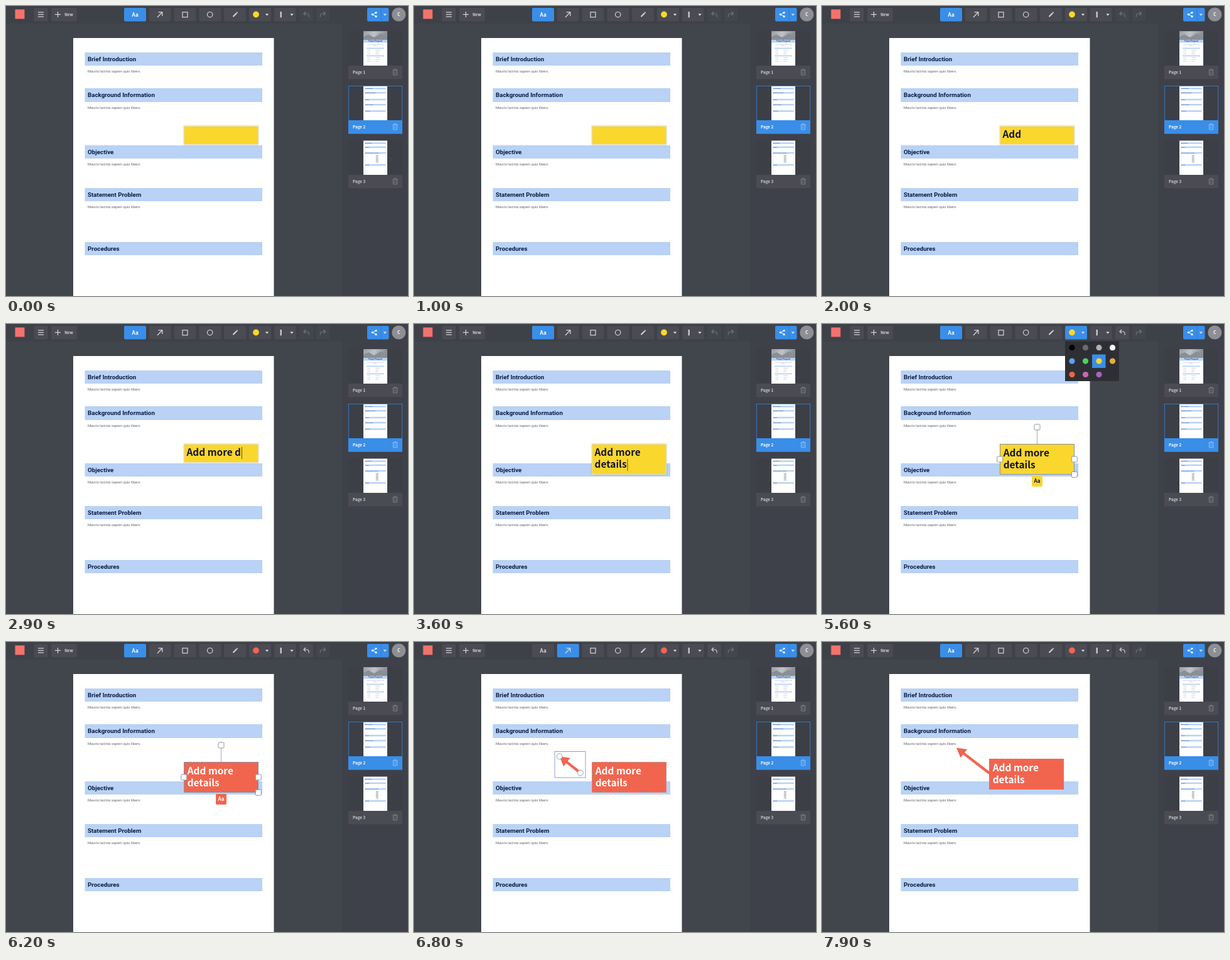
Write an HTML page with a canvas that moves like this. It is 640x462 px and loops after 8 s.

```html
<!DOCTYPE html>
<html lang="en">
<head>
<meta charset="utf-8">
<title>Document annotation</title>
<style>
html, body { margin: 0; width: 100%; height: 100%; overflow: hidden; background: #41464d; }
canvas { display: block; width: 640px; height: 462px; }
</style>
</head>
<body>
<canvas id="stage"></canvas>
<script>
const W = 640, H = 462, LOOP = 8000;
const UI = '"Noto Sans CJK JP", "Noto Sans CJK SC", "Noto Sans CJK", sans-serif';
const DOC = 'Roboto, sans-serif';
const BLUE = '#3a8ee8', BUTTON = '#4b4b54', BAR = '#b9d2f5', NAVY = '#0b1d45';
const YELLOW = '#fad72c', RED = '#f1654f', ICON = '#d5d5d9';

const canvas = document.getElementById('stage');
const dpr = window.devicePixelRatio || 1;
canvas.width = W * dpr;
canvas.height = H * dpr;
const c = canvas.getContext('2d');

function rect(x, y, w, h, fill) {
  c.fillStyle = fill;
  c.fillRect(x, y, w, h);
}

function outline(x, y, w, h, color, lw = 1) {
  c.strokeStyle = color;
  c.lineWidth = lw;
  c.strokeRect(x, y, w, h);
}

function round(x, y, w, h, r, fill, stroke, lw = 1) {
  c.beginPath();
  c.roundRect(x, y, w, h, r);
  if (fill) { c.fillStyle = fill; c.fill(); }
  if (stroke) { c.strokeStyle = stroke; c.lineWidth = lw; c.stroke(); }
}

function dot(x, y, r, fill, stroke, lw = 1) {
  c.beginPath();
  c.arc(x, y, r, 0, Math.PI * 2);
  if (fill) { c.fillStyle = fill; c.fill(); }
  if (stroke) { c.strokeStyle = stroke; c.lineWidth = lw; c.stroke(); }
}

function path(points, stroke, lw = 1.2) {
  c.beginPath();
  points.forEach(([x, y], i) => i ? c.lineTo(x, y) : c.moveTo(x, y));
  c.strokeStyle = stroke;
  c.lineWidth = lw;
  c.stroke();
}

function poly(points, fill) {
  c.beginPath();
  points.forEach(([x, y]) => c.lineTo(x, y));
  c.closePath();
  c.fillStyle = fill;
  c.fill();
}

function text(s, x, y, font, fill, align = 'left') {
  c.font = font;
  c.fillStyle = fill;
  c.textAlign = align;
  c.fillText(s, x, y);
}

const caret = (x, y) => poly([[x - 2.7, y - 1.4], [x + 2.7, y - 1.4], [x, y + 1.6]], '#e4e4e8');

function ease(t, from, to) {
  const p = Math.min(1, Math.max(0, (t - from) / (to - from)));
  return p * p * (3 - 2 * p);
}

// Everything that changes over time
function stateAt(t) {
  const drag = ease(t, 7350, 7650);
  const draw = ease(t, 6450, 7030);
  return {
    typed: t < 2050 ? Math.min(3, Math.floor((t - 1400) / 160)) : 3 + Math.floor((t - 2050) / 110),
    editing: t < 4400,
    selected: t >= 5200 && t < 6300,
    menu: t >= 5450 && t < 5950,
    red: t >= 5950,
    tool: t >= 6300 && t < 7250 ? 'arrow' : 'text',
    arrow: t >= 6500,
    arrowSelected: t >= 6500 && t < 7200,
    tip: [265 - 51 * draw, 208.5 - 40 * draw],
    x: 283 - 17 * drag,
    y: 191 - 5 * drag,
    settled: t >= 7250,
    cursor: t > 2050 && t < 3650 || t >= 3650 && t % 1000 < 500
  };
}

function undoIcon(x, dir, color) {
  path([[x - 1 * dir, 9], [x - 4 * dir, 12], [x - 1 * dir, 15]], color);
  c.beginPath();
  c.moveTo(x - 4 * dir, 12);
  c.lineTo(x + 1 * dir, 12);
  c.quadraticCurveTo(x + 4.3 * dir, 12, x + 4.3 * dir, 17.5);
  c.stroke();
}

function drawToolbar(s) {
  rect(0, 0, W, 28, '#3e4148');
  rect(14.5, 5.5, 15, 15, '#f4726d');

  round(44.5, 3, 22, 21.5, 2, BUTTON);
  for (const y of [10, 13.5, 17]) path([[51, y], [60, y]], ICON);
  round(72, 3, 41, 21.5, 2, BUTTON);
  path([[78, 13.5], [87, 13.5]], ICON);
  path([[82.5, 9], [82.5, 18]], ICON);
  text('New', 93.2, 16, '700 6.2px ' + UI, ICON);

  const on = { 0: s.tool === 'text', 1: s.tool === 'arrow', 5: s.menu };
  for (let i = 0; i < 7; i++) {
    round(188 + i * 39.8, 3, 35, 21.5, 2, on[i] ? BLUE : BUTTON);
  }
  text('Aa', 205.7, 16.6, '700 8.2px ' + UI, on[0] ? '#fff' : ICON, 'center');
  path([[241, 18], [248.5, 10]], ICON, 1.3);
  path([[242.5, 9.8], [248.8, 9.8], [248.8, 16]], ICON, 1.3);
  outline(281, 9.8, 8, 8, ICON, 1.2);
  dot(324.7, 13.7, 4.2, null, ICON, 1.2);
  path([[361.5, 17], [367.2, 11.3]], ICON, 2);
  path([[367.5, 11], [368.6, 9.9]], ICON, 2);
  dot(398, 13.5, 4.9, s.red ? RED : YELLOW);
  caret(415.5, 13.8);
  path([[437.7, 9], [437.7, 18.3]], ICON, 2.2);
  caret(455, 13.8);

  round(467, 3, 22, 21.5, 2, s.editing ? '#44464e' : BUTTON);
  undoIcon(478, 1, s.editing ? '#74757d' : ICON);
  round(493.5, 3, 22, 21.5, 2, '#44464e');
  undoIcon(504.5, -1, '#74757d');

  round(575, 3, 34.5, 21.5, 2, BLUE);
  path([[597.2, 3], [597.2, 24.5]], '#3478c5', 0.8);
  path([[589.5, 10.5], [583.5, 13.5], [589.5, 16.7]], '#fff', 1);
  for (const [x, y] of [[589, 10.5], [583.3, 13.5], [589, 16.7]]) dot(x, y, 1.6, '#fff');
  caret(603.3, 13.8);
  dot(625.3, 13.5, 11, '#8d8f94');
  text('C', 625.3, 16, '700 7px ' + UI, '#fff', 'center');
}

const SECTIONS = [
  ['Brief Introduction', 74, 21],
  ['Background Information', 131, 22],
  ['Objective', 222, 21],
  ['Statement Problem', 290, 21],
  ['Procedures', 376, 21]
];

function drawPage() {
  rect(107, 51, 319.5, 411, '#fff');
  SECTIONS.forEach(([title, y, h], i) => {
    rect(125.5, y, 282.5, h, BAR);
    text(title, 130, y + 14.3, '700 9.8px ' + DOC, NAVY);
    if (i < 4) {
      text('Mauris lacinia sapien quis libero.', 130, y + h + 11.4, '400 5.85px ' + DOC, '#63666c');
    }
  });
}

function trash(x, y, color) {
  path([[x - 4, y - 3], [x + 4, y - 3]], color, 0.9);
  path([[x - 1.5, y - 3], [x - 1.5, y - 4.5], [x + 1.5, y - 4.5], [x + 1.5, y - 3]], color, 0.8);
  path([[x - 3.1, y - 3], [x - 3.1, y + 4.6], [x + 3.1, y + 4.6], [x + 3.1, y - 3]], color, 0.9);
  path([[x - 1, y - 1], [x - 1, y + 3]], color, 0.6);
  path([[x + 1, y - 1], [x + 1, y + 3]], color, 0.6);
}

function thumbBar(y, label) {
  rect(571.2, y, 33.6, 2.5, BAR);
  text(label, 571.8, y + 1.8, '700 1.5px ' + DOC, '#4a6390');
}

function drawCover() {
  const sky = c.createLinearGradient(569, 41, 600, 54);
  sky.addColorStop(0, '#999da2');
  sky.addColorStop(0.5, '#c0c4c8');
  sky.addColorStop(1, '#8d9197');
  rect(569, 40.5, 38, 13.5, sky);
  poly([[569, 49], [577, 45], [586, 50], [596, 44], [607, 48], [607, 54], [569, 54]], '#8a8f95');
  rect(569, 54, 38, 4.5, BAR);
  text('Project Proposal', 588, 57.3, '700 2.9px ' + DOC, '#3d5076', 'center');
  text('Mauris lacinia sapien quis', 588, 61.8, '400 2.4px ' + DOC, '#7c8ba8', 'center');
  text('libero', 588, 64.3, '400 2.4px ' + DOC, '#7c8ba8', 'center');
  for (const y of [66.5, 78.5]) {
    rect(574, y, 28, 1.8, BAR);
    for (let i = 0; i < 3; i++) {
      rect(575, y + 4 + i * 2.7, 5, 0.5, '#a9adb4');
      rect(588, y + 4 + i * 2.7, 7 - i, 0.5, '#a9adb4');
    }
  }
}

function drawSide() {
  rect(535, 28, 105, 434, '#3e4149');
  [40.5, 127.5, 214.5].forEach((y, i) => {
    const active = i === 1;
    rect(545, y, 86, 54.5, '#3d3f47');
    rect(545, y + 54.5, 86, 21.5, active ? BLUE : BUTTON);
    rect(569, y, 38, 54.5, '#fff');
    if (i === 0) drawCover();
    if (active) {
      for (const [title, top] of SECTIONS) thumbBar(y + (top - 51) * 0.119, title);
      outline(545.3, y, 85.4, 75.5, BLUE, 0.7);
    }
    if (i === 2) {
      thumbBar(y + 2.8, 'Evaluation Plan');
      thumbBar(y + 9.2, 'Schedule');
      thumbBar(y + 18.3, 'Budget and Resource Summary');
      thumbBar(y + 37.5, 'Appendix');
      rect(588.5, y + 22.5, 4.5, 13, '#dfe1e4');
      for (let k = 0; k < 5; k++) rect(589.2, y + 24 + k * 2.3, 3, 0.6, '#8d9197');
    }
    text('Page ' + (i + 1), 552, y + 67, '700 6.3px ' + UI, active ? '#fff' : '#cfcfd4');
    trash(619.6, y + 64.7, active ? '#9cc7f5' : '#86878e');
  });
}

function wrap(s, max) {
  const lines = [''];
  for (const word of s.split(' ')) {
    const last = lines.length - 1;
    const joined = lines[last] ? lines[last] + ' ' + word : word;
    if (lines[last] && c.measureText(joined).width > max) lines.push(word);
    else lines[last] = joined;
  }
  return lines;
}

function handle(x, y) {
  round(x - 4.5, y - 4.5, 9, 9, 1.5, '#fff', '#8c93a0');
}

function drawNote(s) {
  const phrase = 'Add more details';
  c.font = '700 15.4px ' + UI;
  const lines = wrap(phrase.slice(0, Math.max(0, s.typed)), 109);
  const { x, y } = s;
  const h = lines.length > 1 ? 49 : 30;
  const fill = s.red ? RED : YELLOW;
  const ink = s.red ? '#fff' : '#14142b';

  c.save();
  if (s.editing) {
    c.shadowColor = 'rgba(0,0,0,.25)';
    c.shadowBlur = 2 * dpr;
  }
  rect(x, y, 119, h, fill);
  c.restore();
  if (!s.settled) {
    if (!s.editing && !s.selected) c.setLineDash([2, 1.5]);
    outline(x + 0.5, y + 0.5, 118, h - 1, s.selected ? '#8790a3' : s.editing ? '#e6dfb8' : '#a9abae');
    c.setLineDash([]);
  }

  const left = x + (s.editing ? 4.5 : 5.7);
  const base = y + (s.editing ? 19 : 19.6);
  lines.forEach((line, i) => text(line, left, base + i * 19, '700 15.4px ' + UI, ink));
  if (s.editing && s.cursor) {
    const end = left + c.measureText(lines[lines.length - 1]).width + 1;
    rect(end, base + (lines.length - 1) * 19 - 14, 0.9, 19, '#4a432a');
  }

  if (s.selected) {
    path([[342.5, 168], [342.5, 191]], '#a4a9b3', 1);
    handle(342.5, 164.3);
    handle(283.3, 215.5);
    handle(401.8, 215.5);
    handle(401.8, 239.8);
    round(334, 242, 17, 17, 2, fill);
    text('Aa', 342.5, 253.3, '700 8.2px ' + UI, ink, 'center');
  }
}

function drawArrow(s) {
  const tail = s.settled ? [266.5, 209] : [265, 208.5];
  const [tx, ty] = s.tip;
  const dx = tail[0] - tx, dy = tail[1] - ty;
  const len = Math.hypot(dx, dy) || 1;
  const ux = dx / len, uy = dy / len;
  const head = Math.min(15, len);
  const at = (d, side) => [tx + ux * d - uy * side, ty + uy * d + ux * side];
  if (len > 2) {
    path([tail, at(head - 1, 0)], RED, 4.2);
    poly([[tx, ty], at(head, 8.5), at(head, -8.5)], RED);
  }
  if (s.arrowSelected) {
    outline(tx - 7.5, ty - 7.8, dx + 15.5, dy + 15.3, '#8094c4', 0.9);
    dot(tx, ty, 4.5, '#fff', '#8c93a0', 0.9);
    dot(tail[0], tail[1], 4.5, '#fff', '#8c93a0', 0.9);
  }
}

const SWATCHES = ['#000', '#6c6c70', '#b0b0b4', '#fff', '#5ca2f6', '#4fd062', YELLOW, '#e5ae3c',
  '#ec6648', '#c668b4', '#a964c2'];

function drawMenu() {
  rect(387, 27.5, 86, 63.5, '#2e2f34');
  rect(430, 48.5, 21.5, 21.5, BLUE);
  SWATCHES.forEach((color, i) => {
    dot(398 + (i % 4) * 21.5, 37.7 + Math.floor(i / 4) * 21.4, 4.6, color);
  });
}

function frame(now) {
  const s = stateAt(now % LOOP);
  c.setTransform(dpr, 0, 0, dpr, 0, 0);
  rect(0, 0, W, H, '#41464d');
  drawPage();
  drawSide();
  drawToolbar(s);
  if (s.arrow) drawArrow(s);
  drawNote(s);
  if (s.menu) drawMenu();
}

const start = performance.now();
function tick() {
  frame(performance.now() - start);
  requestAnimationFrame(tick);
}
tick();
</script>
</body>
</html>
```
